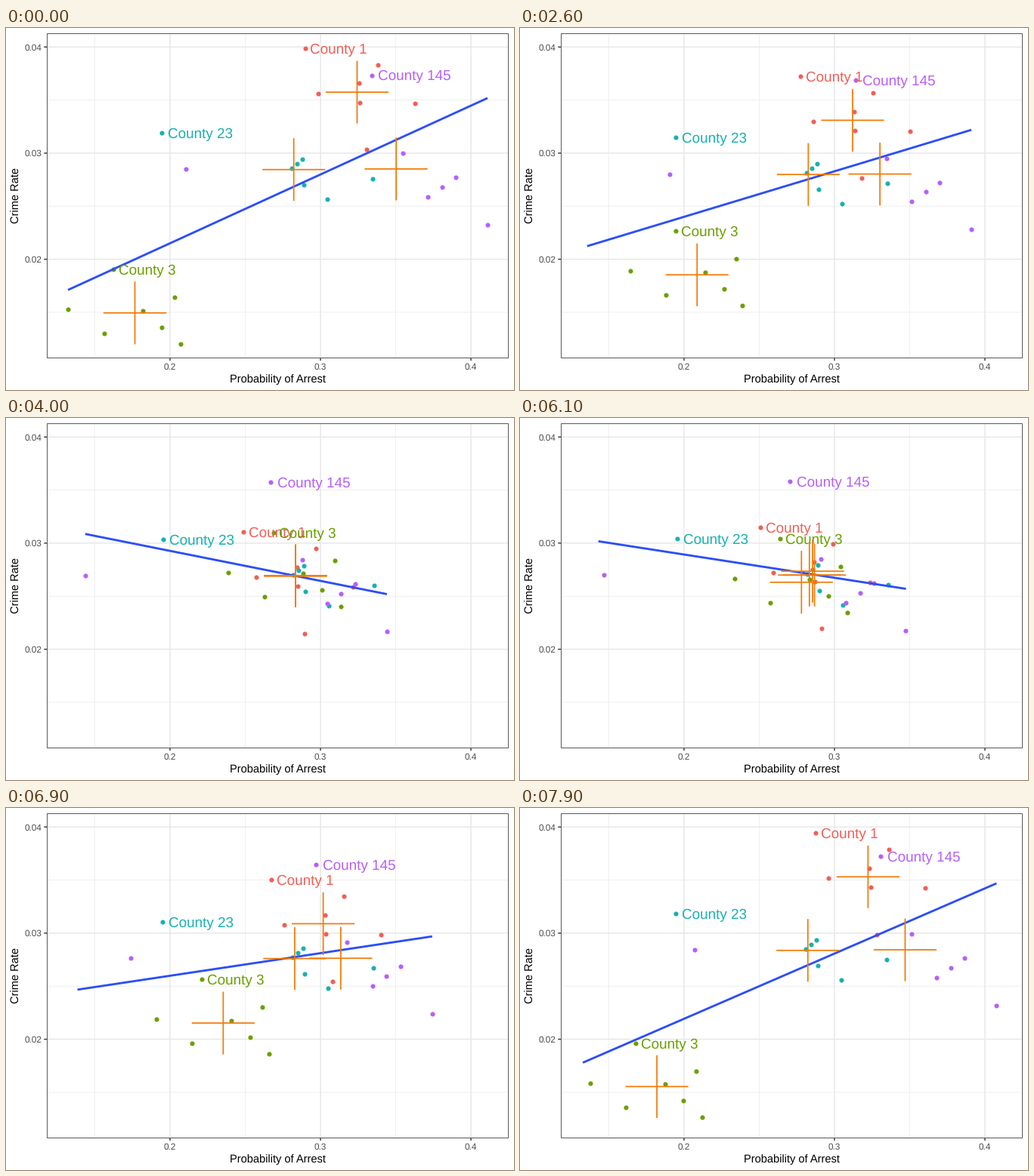
A matplotlib script for the animation above (8000 ms loop, 672x480 px).

```python
import numpy as np
import matplotlib.pyplot as plt
from matplotlib.animation import FuncAnimation
from matplotlib.patches import Rectangle

plt.rcParams["font.family"] = "Liberation Sans"
plt.rcParams["text.hinting"] = "none"

W, H, DPI = 672, 480, 96
PX = 72 / DPI  # points per pixel
LEFT, TOP, RIGHT, BOTTOM = 54.0, 7.4, 664.4, 437.4
THIN, ARM, STEPS = 1.42, 41.6, 20
GREY, ORANGE, BLUE = "#4D4D4D", "#F27A08", "#2C4EF8"


def run(start, end):
    """Three evenly spaced points."""
    return list(np.linspace(start, end, 3))


# Seven observations per group; the first one carries the label.
GROUPS = {
    "County 1": ("#F05F57", [(395.5, 27), (412.5, 87), (466.5, 73.3), (491.7, 48.5),
                             (467.8, 98.8), (540.5, 99.5), (476.5, 161.3)]),
    "County 3": ("#6A9F00", [(142, 320), (82, 373), (129.5, 405), (222.5, 357),
                             *run((181, 374.5), (230.7, 418.5))]),
    "County 23": ("#18B0B3", [(205.8, 139), (394, 208), (425, 227), (485, 200),
                              *run((392, 174), (378, 186))]),
    "County 145": ("#B65FFA", [(483.5, 62.5), (238, 187), (524.7, 166), (637, 260.5),
                               *run((558, 223.5), (595, 198))]),
}

raw = np.array([points for _, points in GROUPS.values()])
means = raw.mean(axis=1, keepdims=True)
demeaned = raw - means + means.mean(axis=0)


def fit_ends(points):
    """Ends of the least-squares line across the range of the points."""
    x, y = points.reshape(-1, 2).T
    ends = np.array([x.min(), x.max()])
    return np.column_stack([ends, np.polyval(np.polyfit(x, y, 1), ends)])


def mix(a, b, p):
    return a + (b - a) * p


raw_fit, demeaned_fit = fit_ends(raw), fit_ends(demeaned)

fig = plt.figure(figsize=(W / DPI, H / DPI), dpi=DPI, facecolor="white")
ax = fig.add_axes([0, 0, 1, 1])
ax.set_xlim(0, W)
ax.set_ylim(H, 0)
ax.axis("off")


def stroke(xs, ys, color, width, z):
    return ax.plot(xs, ys, color=color, lw=width * PX, zorder=z,
                   solid_capstyle="butt", snap=False)[0]


def write(x, y, text, size, color="black", ha="center", **kw):
    return ax.text(x, y, text, size=size, color=color, ha=ha, va="baseline", **kw)


def draw_axes():
    for k in range(3):
        x, y = 217 + 199 * k, 25.2 + 140.7 * k
        for shift, color, width in ((0.5, "#E9E9E9", THIN / 2), (0, "#E7E7E7", THIN)):
            stroke([x - 199 * shift] * 2, [TOP, BOTTOM], color, width, 1 - shift)
            stroke([LEFT, RIGHT], [y + 140.7 * shift] * 2, color, width, 1 - shift)
        stroke([x] * 2, [BOTTOM, BOTTOM + 3.7], "#333333", THIN, 1)
        stroke([LEFT - 3.7, LEFT], [y] * 2, "#333333", THIN, 1)
        write(x, 453, f"{0.2 + 0.1 * k:.1f}", 8.8, GREY)
        write(47.4, y + 4.3, f"{0.04 - 0.01 * k:.2f}", 8.8, GREY, "right")
    ax.add_patch(Rectangle((LEFT, TOP), RIGHT - LEFT, BOTTOM - TOP, fill=False,
                           ec="#595959", lw=PX, zorder=9, snap=True))
    write(359.3, 470, "Probability of Arrest", 11)
    write(18, 222.5, "Crime Rate", 11, rotation=90, rotation_mode="anchor")


draw_axes()
dots, labels, bars = [], [], []
for n, (name, (color, _)) in enumerate(GROUPS.items()):
    dots.append(ax.plot([], [], "o", ms=6.15 * PX, mfc=color, mec="none",
                        snap=False, zorder=3 + n / 10)[0])
    labels.append(write(0, 0, name, 14.2, color, "left", zorder=5 + n / 10))
    bars.append([stroke([], [], ORANGE, 1.75, 6) for _ in range(2)])
trend = stroke([], [], BLUE, 2.85, 4)


def update(i):
    # Hold, collapse onto the common mean, hold, then return.
    p = np.clip(min(i - STEPS, 4 * STEPS - i) / STEPS, 0, 1)
    trend.set_data(*mix(raw_fit, demeaned_fit, p).T)
    groups = mix(raw, demeaned, p)
    for points, dot, label, (across, upright) in zip(groups, dots, labels, bars):
        dot.set_data(*points.T)
        x, y = points[0]
        label.set_position((x + len(label.get_text()) - 1, y + 7))
        cx, cy = points.mean(axis=0)
        across.set_data([cx - ARM, cx + ARM], [cy, cy])
        upright.set_data([cx, cx], [cy - ARM, cy + ARM])
    return [trend, *dots, *labels]


anim = FuncAnimation(fig, update, frames=4 * STEPS, interval=100,
                     init_func=lambda: update(0), repeat=True, repeat_delay=0)
plt.show()
```
